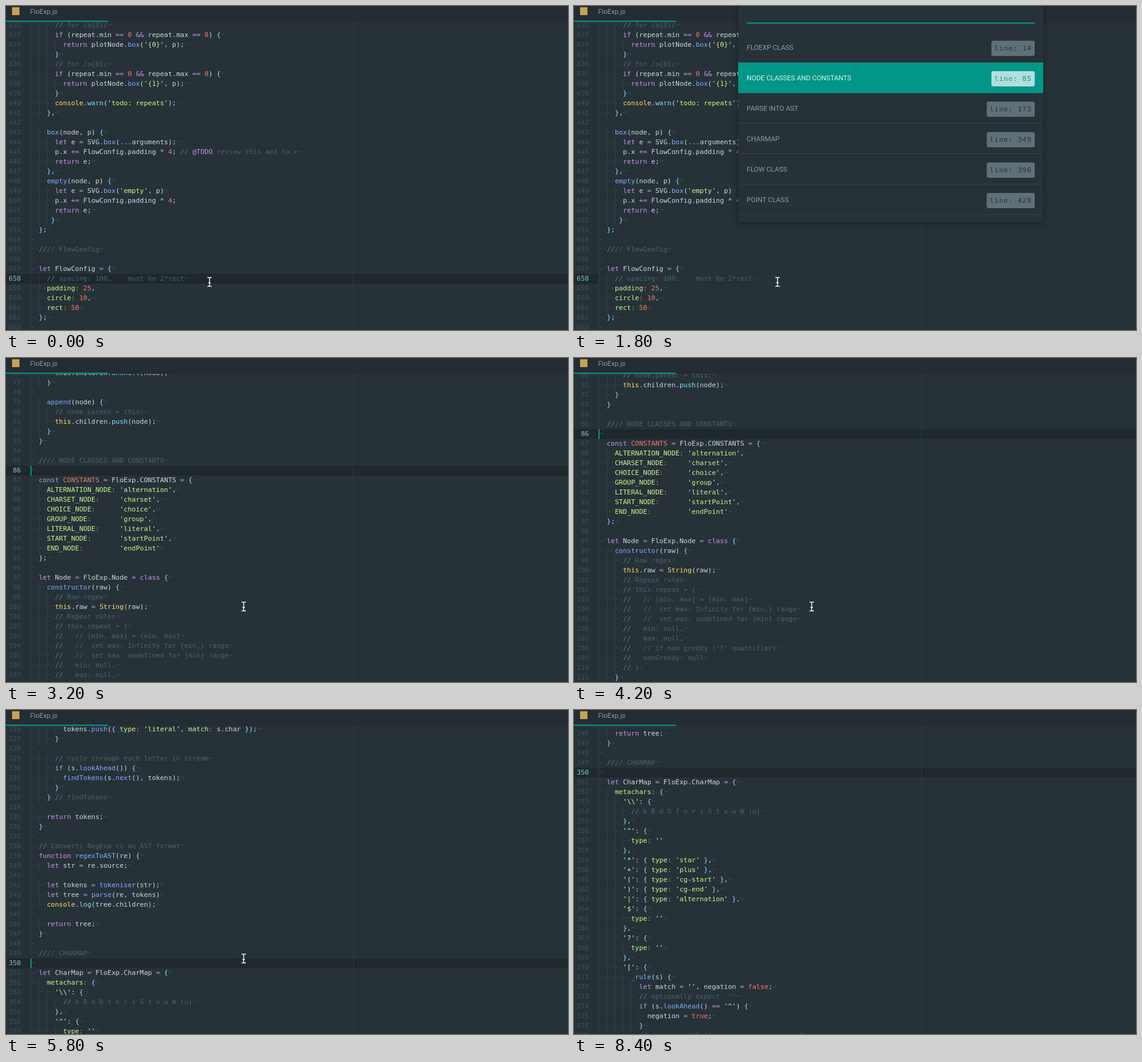
An HTML page for the animation above (8.6 s loop, 921 by 532 pixels).

```html
<!DOCTYPE html>
<html lang="en">
<head>
<meta charset="utf-8">
<title>FloExp.js</title>
<style>
html, body { margin: 0; width: 100%; height: 100%; overflow: hidden; background: #263238; }
svg { display: block; width: 921px; height: 532px; }
text { white-space: pre; }
.code text, .badge { font: 11px "DejaVu Sans Mono", monospace; fill: #cdd8de; }
.ui { font: 11.2px Roboto, sans-serif; }
.code .num { fill: #405159; text-anchor: end; }
.code .num.on { fill: #80cbc4; }
.badge { letter-spacing: 1px; }
.ws { fill: #3a4c55; }
.note { fill: #4b616b; }
.slash { fill: #5f7a86; }
.str { fill: #cdf48f; }
.quote { fill: #d9f5dd; }
.kw { fill: #c792ea; }
.fn { fill: #82aaff; }
.op { fill: #89ddff; }
.obj { fill: #ffd973; }
.lit { fill: #f77669; }
</style>
</head>
<body>
<svg viewBox="0 0 921 532">
  <rect width="921" height="532" fill="#263238"/>
  <rect id="active" height="16" fill="#1f282d"/>
  <path d="M40.5 26V532M569.5 26V532" stroke="#304047"/>
  <g id="blocks" class="code"></g>
  <rect id="caret" x="40" width="2" height="16" fill="#009688"/>
  <rect width="921" height="26" fill="#252c33"/>
  <rect y="24" width="167" height="2" fill="#009688"/>
  <rect x="10" y="2" width="12" height="13" fill="#c9a253"/>
  <text class="ui" x="39.5" y="13" fill="#8d9ca4">FloExp.js</text>
  <g id="palette"></g>
  <path id="mouse" d="M-3.5 -7.5Q0 -7.5 0 -5.5Q0 -7.5 3.5 -7.5M0 -6V6M-3.5 7.5Q0 7.5 0 5.5Q0 7.5 3.5 7.5M-2 1.5H2"
    fill="none" stroke="#fff" stroke-width="1.3"/>
</svg>
<script>
const LOOP = 8600, STEP = 200, ROW = 16, LEFT = 40.5, CHAR = 6.62;
const $ = id => document.getElementById(id);
const esc = s => s.replace(/&/g, '&amp;').replace(/</g, '&lt;');
const span = (cls, s) => cls ? `<tspan class="${cls}">${esc(s)}</tspan>` : esc(s);

const sources = [
  { first: 632, active: 658, code: String.raw`
      // for /a{0}/
      if (repeat.min == 0 && repeat.max == 0) {
        return plotNode.box('{0}', p);
      }
      // for /a{0}/
      if (repeat.min == 0 && repeat.max == 0) {
        return plotNode.box('{1}', p);
      }
      console.warn('todo: repeats');
    },

    box(node, p) {
      let e = SVG.box(...arguments);
      p.x += FlowConfig.padding * 4; // @TODO review this add to x
      return e;
    },
    empty(node, p) {
      let e = SVG.box('empty', p)
      p.x += FlowConfig.padding * 4;
      return e;
     }
  };

  //// FlowConfig

  let FlowConfig = {
    // spacing: 100,    must be 2*rect
    padding: 25,
    circle: 10,
    rect: 50
  };
` },
  { first: 62, active: 86, code: String.raw`
    }

    traverse(fn, nodeType) {
      travel(this.children, fn);
      function travel(stack, fn) {
        stack.forEach(node => {
          if (!nodeType || node.type == nodeType) fn(node);
          if (node.children) travel(node.children, fn);
        });
      }
    }

    prepend(node) {
      // node.parent = this;
      this.children.unshift(node);
    }

    append(node) {
      // node.parent = this;
      this.children.push(node);
    }
  }

  //// NODE CLASSES AND CONSTANTS

  const CONSTANTS = FloExp.CONSTANTS = {
    ALTERNATION_NODE: 'alternation',
    CHARSET_NODE:     'charset',
    CHOICE_NODE:      'choice',
    GROUP_NODE:       'group',
    LITERAL_NODE:     'literal',
    START_NODE:       'startPoint',
    END_NODE:         'endPoint'
  };

  let Node = FloExp.Node = class {
    constructor(raw) {
      // Raw regex
      this.raw = String(raw);
      // Repeat rules
      // this.repeat = {
      //   // [min, max] = {min, max}
      //   //  set max: Infinity for {min,} range
      //   //  set max: undefined for {min} range
      //   min: null,
      //   max: null,
      //   // if non greedy ('?' quantifier)
      //   nonGreedy: null
      // }
    }` },
  { first: 326, active: 350, code: String.raw`
        tokens.push({ type: 'literal', match: s.char });
      }

      // cycle through each letter in stream
      if (s.lookAhead()) {
        findTokens(s.next(), tokens);
      }
    } // findTokens

    return tokens;
  }

  // Converts RegExp to an AST format
  function regexToAST(re) {
    let str = re.source;

    let tokens = tokeniser(str);
    let tree = parse(re, tokens)
    console.log(tree.children);

    return tree;
  }

  //// CHARMAP

  let CharMap = FloExp.CharMap = {
    metachars: {
      '\\': {
        // b B d D f n r s S t v w W (u)
      },
      '^': {
        type: ''
      },
      '*': { type: 'star' },
      '+': { type: 'plus' },
      '(': { type: 'cg-start' },
      ')': { type: 'cg-end' },
      '|': { type: 'alternation' },
      '$': {
        type: ''
      },
      '?': {
        type: ''
      },
      '[': {
        _rule(s) {
          let match = '', negation = false;
          // optionally expect '^'
          if (s.lookAhead() == '^') {
            negation = true;
          }
          // repeat until ']', expect a non special character` }
];

// First rule that matches at the current position wins.
const rules = [
  ['note', /\/\/.*/y],
  ['str', /'[^']*'/y],
  ['kw', /\b(?:if|return|let|const|function|class)\b/y],
  ['obj', /\b(?:this|console|String)\b/y],
  ['lit', /CONSTANTS(?= = F)|\b(?:true|false|\d+)\b|(?<=\w):/y],
  ['op', /(?<=(?:children|console)\.)\w+(?=\()/y],
  ['fn', /\w+(?=\()/y],
  ['str', /\w+(?=:)/y],
  ['', /\w+|\s+/y],
  ['kw', /[=!+&|>]+|\.\.\./y],
  ['op', /[{}\[\];,.*]/y],
  ['', /./y]
];

function paint(cls, s) {
  if (cls === 'note') {
    const [before, after] = s.slice(2).split('@TODO');
    return span('slash', '//') + span('note', before) +
      (after === undefined ? '' : span('kw', '@TODO') + span('note', after));
  }
  if (s[0] === "'") return span('quote', "'") + span('str', s.slice(1, -1)) + span('quote', "'");
  return span(cls, s);
}

function highlight(line) {
  const indent = line.search(/\S|$/);
  let out = span('ws', '·'.repeat(indent)), pos = indent;
  while (pos < line.length) {
    for (const [cls, re] of rules) {
      re.lastIndex = pos;
      const hit = re.exec(line);
      if (!hit) continue;
      out += paint(cls, hit[0]);
      pos = re.lastIndex;
      break;
    }
  }
  return out + span('ws', '¬');
}

function blockMarkup({ first, active, code }) {
  const rows = code.slice(1).split('\n').map((line, i) => {
    const y = (first + i - active) * ROW;
    const indent = line.search(/\S|$/);
    let guides = '';
    for (let c = 2; c < indent; c += 2) {
      guides += `M${Math.round(LEFT + c * CHAR) + .5} ${y - 7}v${ROW}`;
    }
    return `<path d="${guides}" stroke="#2f3f47"/>` +
      `<text class="num${first + i === active ? ' on' : ''}" x="24.4" y="${y + 4}">${first + i}</text>` +
      `<text x="${LEFT}" y="${y + 4}">${highlight(line)}</text>`;
  });
  return `<g>${rows.join('')}</g>`;
}

const entries = [['FLOEXP CLASS', 14], ['NODE CLASSES AND CONSTANTS', 85], ['PARSE INTO AST', 173],
  ['CHARMAP', 349], ['FLOW CLASS', 396], ['POINT CLASS', 428]];

function paletteMarkup(selected) {
  const rows = entries.map(([name, line], i) => {
    const y = 43 + i * 50, on = i === selected, label = `line: ${line}`;
    const w = label.length * 7.62 + 10;
    return (on ? `<rect x="269" y="${y}" width="500" height="50" fill="#009688"/>`
               : `<path d="M269 ${y + 49.5}h500" stroke="#32424a"/>`) +
      `<text class="ui" x="283" y="${y + 29}" fill="${on ? '#e0f2f1' : '#8c9da6'}">${name}</text>` +
      `<rect x="${755 - w}" y="${y + 14}" width="${w}" height="25" rx="3" fill="${on ? '#b2dfdb' : '#5f7078'}"/>` +
      `<text class="badge" x="${760 - w}" y="${y + 30}" style="fill:${on ? '#009688' : '#263238'}">${label}</text>`;
  });
  return '<rect x="269" y="-10" width="500" height="365" fill="#263238" style="filter:drop-shadow(0 2px 4px #0006)"/>' +
    '<rect x="283" y="27" width="472" height="2" fill="#009688"/>' + rows.join('');
}

// Each track lists [time, value] pairs.
const blockTrack = [[0, 0], [2000, 1], [5600, 2]];
const menuTrack = [[0, -1], [600, 0], [1600, 1], [2000, -1], [4400, 0], [5000, 1], [5200, 2], [5400, 3], [5600, -1]];
const mouseTrack = [[0, [333.5, 453]], [2000, [389.5, 408]], [7200, null]];
const scrollTracks = [
  [[0, 447]],
  [[2400, 415], [2600, 395], [2800, 330], [3000, 252], [3200, 184], [3400, 140], [3600, 124]],
  [[6000, 415], [6200, 393], [6400, 325], [6600, 248], [6800, 178], [7000, 122], [7200, 102]]
];

const hold = (track, t) => track.reduce((v, [at, value]) => t >= at ? value : v, track[0][1]);
const show = (el, on) => el.style.display = on ? '' : 'none';

$('blocks').innerHTML = sources.map(blockMarkup).join('') ;
const blocks = [...$('blocks').children];
let shownMenu = null;

function render(time) {
  const t = Math.floor(time % LOOP / STEP) * STEP;
  const index = hold(blockTrack, t), menu = hold(menuTrack, t), mouse = hold(mouseTrack, t);
  const y = hold(scrollTracks[index], t);

  blocks.forEach((g, i) => show(g, i === index));
  blocks[index].setAttribute('transform', `translate(0 ${y})`);
  $('active').setAttribute('y', y - 7);
  $('active').setAttribute('width', menu < 0 ? 921 : 40);
  $('caret').setAttribute('y', y - 7);
  show($('caret'), index > 0 && menu < 0 && t % 800 < 400);

  if (menu !== shownMenu) {
    $('palette').innerHTML = menu < 0 ? '' : paletteMarkup(menu);
    shownMenu = menu;
  }
  show($('mouse'), mouse);
  if (mouse) $('mouse').setAttribute('transform', `translate(${mouse})`);
}

const start = performance.now();
function tick() {
  render(performance.now() - start);
  requestAnimationFrame(tick);
}
tick();
</script>
</body>
</html>
```
